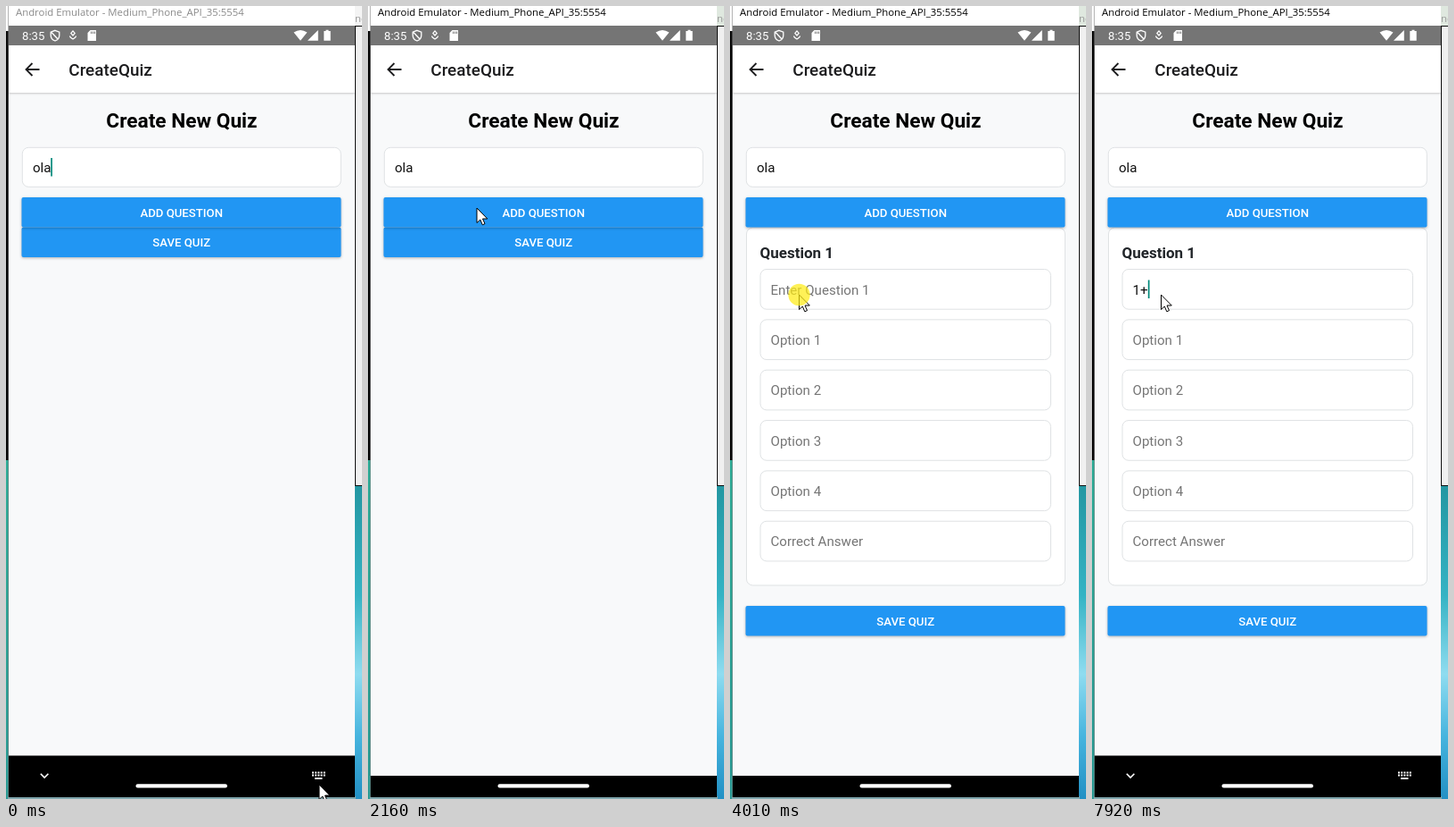
Write an HTML page that moves like this. It is 399 px wide and 887 px high and loops after 8 s.

```html
<!DOCTYPE html>
<html lang="en">
<head>
<meta charset="utf-8">
<title>Create Quiz</title>
<style>
  html, body { margin: 0; width: 100%; height: 100%; overflow: hidden; background: #f8f9fa; }
  svg { display: block; width: 100vw; height: 100vh; font-family: Roboto, sans-serif; }
  .field { fill: #fff; stroke: #dfe2e4; }
  .body { font-size: 15.1px; fill: #111; }
  .hint { fill: #757575; }
  .btn rect { fill: #2196f3; filter: drop-shadow(0 1.6px 1.6px rgba(0,0,0,.28)); }
  .btn text { font-size: 13.2px; font-weight: 500; fill: #fff; text-anchor: middle; }
  .window { font-family: "Open Sans", sans-serif; font-size: 11.36px; }
</style>
</head>
<body>
<svg viewBox="0 0 399 887" preserveAspectRatio="none">
  <defs>
    <linearGradient id="sea" x2="0" y2="1">
      <stop offset="0" stop-color="#2397a2"/>
      <stop offset=".35" stop-color="#35b3c4"/>
      <stop offset=".6" stop-color="#8fdcf0"/>
      <stop offset=".8" stop-color="#46b4de"/>
      <stop offset="1" stop-color="#2290c4"/>
    </linearGradient>
    <linearGradient id="shore" x2="0" y2="1">
      <stop offset="0" stop-color="#2fae98"/>
      <stop offset="1" stop-color="#2a9a94"/>
    </linearGradient>
    <radialGradient id="wave">
      <stop offset="0" stop-color="#1a78c8"/>
      <stop offset=".5" stop-color="#1a78c8" stop-opacity=".8"/>
      <stop offset="1" stop-color="#1a78c8" stop-opacity="0"/>
    </radialGradient>
    <clipPath id="addClip"><rect x="17.5" y="214" width="358" height="33.5" rx="2"/></clipPath>
  </defs>

  <!-- desktop and window frame -->
  <rect width="399" height="887" fill="#fff"/>
  <rect y="28" width="3" height="480" fill="#0a0a0a"/>
  <rect y="508" width="3" height="379" fill="url(#shore)"/>
  <rect id="corner" x="391" width="8" height="22"/>
  <text id="cornerText" class="window" x="391" y="18" fill="#999">nc</text>
  <rect x="391" y="537" width="8" height="350" fill="url(#sea)"/>
  <rect x="391.5" y="22.5" width="12" height="514" fill="#f0f0f0" stroke="#111"/>
  <text id="caption" class="window" x="11" y="11">Android Emulator - Medium_Phone_API_35:5554</text>
  <rect x="2" y="884" width="390" height="3" fill="#7fa6ad"/>
  <path d="M2.5 0V885" stroke="#777" stroke-opacity=".55"/>

  <!-- app -->
  <rect x="3" y="22" width="388" height="863" fill="#f8f9fa"/>
  <rect x="3" y="44" width="388" height="53" fill="#fff" style="filter:drop-shadow(0 1px 1px rgba(0,0,0,.2))"/>
  <rect x="3" y="22" width="388" height="22" fill="#757575"/>
  <g fill="#fff">
    <text x="18" y="38" font-size="13.2">8:35</text>
    <path d="M55 27.3l4.8 1.9v3.6c0 3-2 5.200-4.800 6.200-2.800-1-4.800-3.200-4.800-6.200v-3.600zM51 29.500l7.500 8" fill="none" stroke="#fff" stroke-width="1.300"/>
    <path d="M75 28l2.200 2.400-2.200 2.600-2.200-2.600zM71.500 33.500q0 1.500 3.500 3.500 3.500-2 3.500-3.500" fill="none" stroke="#fff" stroke-width="1.200"/>
    <path d="M94.500 27h6.500v12h-9.500v-9z"/>
    <path d="M95.500 28.500v2.500m2-2.500v2.500m2-2.500v2.500" stroke="#757575"/>
    <path d="M322.500 29.500q7.500-5 15 0L330 38.800zM338 38.800h11.800V27zM358.500 28v-1.200h3V28h2.200v10.800h-7.400V28z"/>
  </g>
  <path d="M37.500 71H22.500M29.500 64l-7 7 7 7" fill="none" stroke="#1c1c1e" stroke-width="1.800"/>
  <text x="70.300" y="78" font-size="18.900" font-weight="500" fill="#1c1c1e">CreateQuiz</text>
  <text x="197" y="136.300" font-size="22.660" font-weight="700" text-anchor="middle">Create New Quiz</text>
  <rect class="field" x="18.300" y="158.300" width="357" height="44" rx="7"/>
  <text class="body" x="30" y="186">ola</text>

  <g id="card">
    <rect class="field" x="18.500" y="248" width="357" height="400" rx="7"/>
    <text x="33.500" y="281.700" font-size="17" font-weight="700" fill="#212529">Question 1</text>
    <g id="fields"></g>
  </g>
  <g id="save" class="btn">
    <rect x="17.500" y="247.500" width="358" height="33.500" rx="2"/>
    <text x="196.700" y="269.200">SAVE QUIZ</text>
  </g>
  <g class="btn">
    <rect x="17.500" y="214" width="358" height="33.500" rx="2"/>
    <g clip-path="url(#addClip)"><circle id="ripple" cy="231" fill="url(#wave)"/></g>
    <text x="196.700" y="235.700">ADD QUESTION</text>
  </g>
  <rect id="caret" width="1.700" height="20.500" fill="#00897b"/>

  <!-- navigation bar -->
  <rect id="bar" x="3" width="388"/>
  <g id="keys">
    <path d="M38.800 858.800l4.300 4.300 4.300-4.300" fill="none" stroke="#fff" stroke-width="1.600"/>
    <path d="M343 857.500h15M343 860.500h15" stroke="#fff" stroke-width="2" stroke-dasharray="2 1.200"/>
    <path d="M346 864h8.500" stroke="#fff" stroke-width="1.800"/>
  </g>
  <rect x="145.500" y="870.300" width="102.500" height="4.300" rx="2.100" fill="#fff"/>

  <path id="mouse" d="M0 0V16.500L3.800 13 6.300 18.800 9 17.600 6.500 12H11.800Z" fill="#fff" stroke="#000" stroke-linejoin="round"/>
  <circle id="press" r="12.200" fill="#ffeb10"/>
</svg>
<script>
const LOOP = 8000;
const $ = id => document.getElementById(id);
const set = (id, attrs) => {
  for (const k in attrs) $(id).setAttribute(k, attrs[k]);
};
const show = (id, on) => set(id, { visibility: on ? "visible" : "hidden" });
const within = (t, a, b) => t >= a && t < b;

const hints = ["Enter Question 1", "Option 1", "Option 2", "Option 3", "Option 4", "Correct Answer"];
$("fields").innerHTML = hints.map((hint, i) => {
  const y = 294.5 + i * 56.35;
  return `<rect class="field" x="34" y="${y}" width="325.5" height="44.7" rx="7"/>
    <text class="body hint" x="45.5" y="${y + 28}">${hint}</text>`;
}).join("");
const answer = $("fields").querySelector("text");

// pointer path: time, x, y
const path = [
  [70, 351, 871], [590, 157, 312], [700, 121, 266], [820, 122, 226],
  [2760, 122, 226], [2960, 111, 238],
  [3600, 111, 238], [3790, 72, 373], [3880, 77, 345], [3960, 77.5, 323]
];

function pointer(t) {
  const i = path.findIndex(p => p[0] > t);
  if (i === 0) return path[0].slice(1);
  if (i < 0) return path[path.length - 1].slice(1);
  const [t0, x0, y0] = path[i - 1], [t1, x1, y1] = path[i];
  const k = (t - t0) / (t1 - t0);
  return [x0 + (x1 - x0) * k, y0 + (y1 - y0) * k];
}

// the caret flips at each listed time, starting hidden
const blinks = [0, 290, 790, 1290, 1810, 2050, 4130, 4600, 5130, 5580, 6110, 6570, 7100, 7580, 7650];
const caretOn = t => blinks.filter(b => b <= t).length % 2 === 1;

function draw(t) {
  const focused = t >= 1810, added = t >= 3380;
  const keyboard = t < 2080 || t >= 4330;
  const typed = t >= 7920 ? "1+" : t >= 7650 ? "1" : "";

  set("caption", { fill: focused ? "#000" : "#8a8a8a" });
  set("corner", { fill: focused ? "#dfe8df" : "#f4f4f4" });
  $("cornerText").textContent = focused ? "nd" : "nc";

  show("card", added);
  set("save", { transform: `translate(0 ${added ? 423.5 : 0})` });
  answer.textContent = typed || hints[0];
  answer.classList.toggle("hint", !typed);

  show("caret", caretOn(t));
  set("caret", t < 3000
    ? { x: 50.2, y: 170 }
    : { x: [45.6, 54.2, 62.8][typed.length], y: 306.5 });

  const top = keyboard ? 838.5 : 861;
  set("bar", { y: top, height: 885 - top });
  show("keys", t < 2080 || t >= 4460);

  const k = Math.min(1, Math.max(0, (t - 3100) / 280));
  show("ripple", within(t, 3100, 3480));
  set("ripple", { cx: 111 + 43 * k, r: 20 + 110 * k, opacity: t < 3300 ? 0.9 : 0.9 * (3480 - t) / 180 });

  const [x, y] = pointer(t);
  set("mouse", { transform: `translate(${x} ${y})` });
  show("press", within(t, 1810, 2000) || within(t, 3040, 3200) || within(t, 3960, 4130));
  set("press", { cx: x, cy: y, opacity: t < 3500 ? 0.55 : 0.7 });
}

const start = performance.now();
function frame() {
  draw((performance.now() - start) % LOOP);
  requestAnimationFrame(frame);
}
frame();
</script>
</body>
</html>
```
